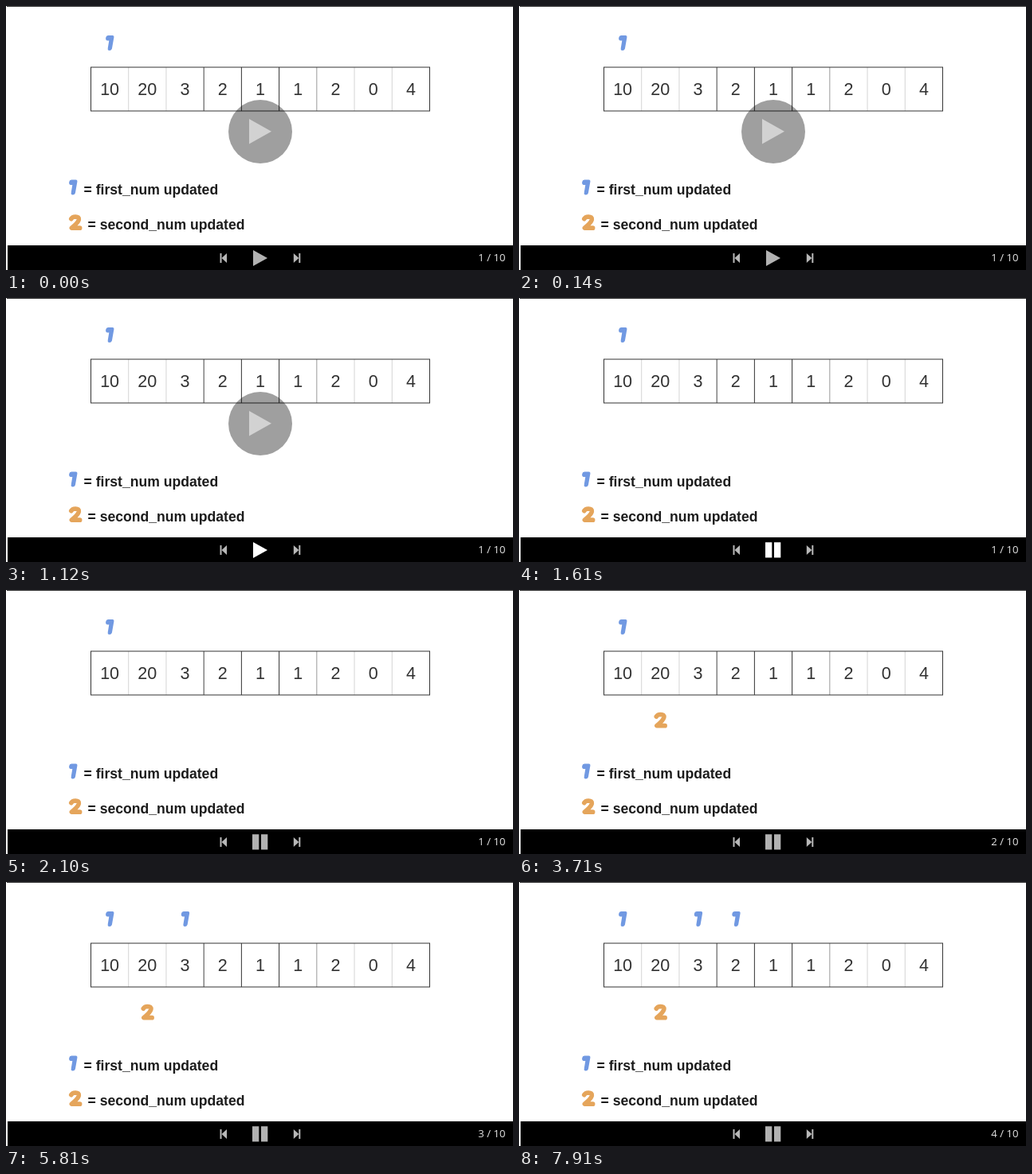
Write an HTML page that moves like this. It is 636 by 332 pixels and loops after 8000 ms.

```html
<!DOCTYPE html>
<html lang="en">
<head>
<meta charset="utf-8">
<title>Array slideshow</title>
<style>
  html, body { margin: 0; width: 100%; height: 100%; overflow: hidden; background: #fff; }
  svg { display: block; }
  text { font-family: "Liberation Sans", Arial, sans-serif; }
  .cell { font-size: 21.5px; fill: #333; text-anchor: middle; }
  .legend { font-size: 17.6px; font-weight: bold; fill: #1c1c1c; }
  #page { font: 13.2px "Open Sans", "Noto Sans", sans-serif; fill: #e4e4e4; text-anchor: end; }
  .skip { fill: #b8b8b8; }
  .skip.hot { fill: #fff; }
</style>
</head>
<body>
<svg width="636" height="332" viewBox="0 0 636 332">
  <defs>
    <path id="one" fill="#7199e2" stroke="#7199e2" stroke-width="1.6" stroke-linejoin="round"
      d="M2 3.4 Q2.3 1.6 4.2 1.4 L9.6 1.2 Q10.8 1.3 10.6 2.8 L8.1 17 Q7.6 18.7 5.7 18.7 Q4.2 18.6 4.5 17 L6.3 6 L3 6.1 Q1.6 5.8 2 3.4 Z"/>
    <path id="two" fill="none" stroke="#e5a55b" stroke-width="5.7" stroke-linecap="round" stroke-linejoin="round"
      d="M3.8 6.2 Q5.2 3.6 9.2 3.5 Q13.8 3.6 13.3 7.2 Q12.6 10.6 4.4 17.7 L14.6 17.7"/>
  </defs>
  <rect width="636" height="332" fill="#fff"/>
  <path d="M1 .5 H636" stroke="#333"/>
  <g id="grid"></g>
  <use href="#one" x="124" y="36.5"/>
  <use href="#two" x="168.5" y="153" data-from="2"/>
  <use href="#one" x="218.7" y="36.5" data-from="3"/>
  <use href="#one" x="266.2" y="36.5" data-from="4"/>
  <use href="#one" x="78" y="218"/>
  <text class="legend" x="97.5" y="236.7">= first_num updated</text>
  <use href="#two" x="78" y="261.5"/>
  <text class="legend" x="102.5" y="280.7">= second_num updated</text>
  <g id="cover">
    <circle cx="319" cy="158" r="40" fill="#000" fill-opacity=".376"/>
    <path d="M305 142 L333 157.7 L305 173.5 Z" fill="#d2d2d2"/>
  </g>
  <rect x="2" y="301" width="634" height="31" fill="#000"/>
  <path class="skip" d="M268.5 311 h2 v12 h-2 Z M277 311 L270.5 317 L277 323 Z"/>
  <path id="play" d="M310 307 L328 317 L310 327 Z"/>
  <path id="pause" d="M309 307.3 h8.3 v19.3 h-8.3 Z M320 307.3 h8.3 v19.3 h-8.3 Z"/>
  <path id="next" class="skip" d="M367.3 311 h2 v12 h-2 Z M360.8 311 L367.3 317 L360.8 323 Z"/>
  <text id="page" x="626.5" y="321.3"></text>
</svg>
<script>
  const LOOP = 8000;
  const STEPS = [
    { at: 0, page: 1, playing: false, hover: "" },
    { at: 1120, page: 1, playing: false, hover: "main" },
    { at: 1610, page: 1, playing: true, hover: "main" },
    { at: 2030, page: 1, playing: true, hover: "next" },
    { at: 2100, page: 1, playing: true, hover: "" },
    { at: 3710, page: 2, playing: true, hover: "" },
    { at: 5810, page: 3, playing: true, hover: "" },
    { at: 7910, page: 4, playing: true, hover: "" }
  ];
  const VALUES = [10, 20, 3, 2, 1, 1, 2, 0, 4];
  const LEFT = 106.5, TOP = 77, BOTTOM = 132, CELL = 47.22;
  const byId = id => document.getElementById(id);

  function add(parent, name, attrs, content = "") {
    const el = document.createElementNS("http://www.w3.org/2000/svg", name);
    for (const key in attrs) el.setAttribute(key, attrs[key]);
    el.textContent = content;
    parent.append(el);
  }

  function buildGrid() {
    const grid = byId("grid");
    const shades = ["#333", "#d4d4d4", "#d4d4d4", "#444", "#333", "#333", "#999", "#d4d4d4", "#d4d4d4", "#333"];
    shades.forEach((stroke, i) =>
      add(grid, "path", { d: `M${LEFT + i * CELL} ${TOP} V${BOTTOM}`, stroke }));
    for (const y of [TOP, BOTTOM])
      add(grid, "path", { d: `M${LEFT - 0.5} ${y} H532`, stroke: "#333" });
    VALUES.forEach((value, i) =>
      add(grid, "text", { class: "cell", x: LEFT + (i + 0.5) * CELL, y: 112 }, value));
  }

  const show = (el, on) => el.setAttribute("visibility", on ? "visible" : "hidden");
  const marks = document.querySelectorAll("[data-from]");
  let shown;

  function render(step) {
    const fill = step.hover === "main" ? "#fff" : "#b2b2b2";
    for (const id of ["play", "pause"]) byId(id).setAttribute("fill", fill);
    show(byId("play"), !step.playing);
    show(byId("pause"), step.playing);
    show(byId("cover"), !step.playing);
    byId("next").classList.toggle("hot", step.hover === "next");
    byId("page").textContent = `${step.page} / 10`;
    marks.forEach(mark => show(mark, step.page >= mark.dataset.from));
  }

  const start = performance.now();
  function tick() {
    const time = (performance.now() - start) % LOOP;
    const step = STEPS.filter(s => s.at <= time).pop();
    if (step !== shown) render(shown = step);
    requestAnimationFrame(tick);
  }

  buildGrid();
  tick();
</script>
</body>
</html>
```
